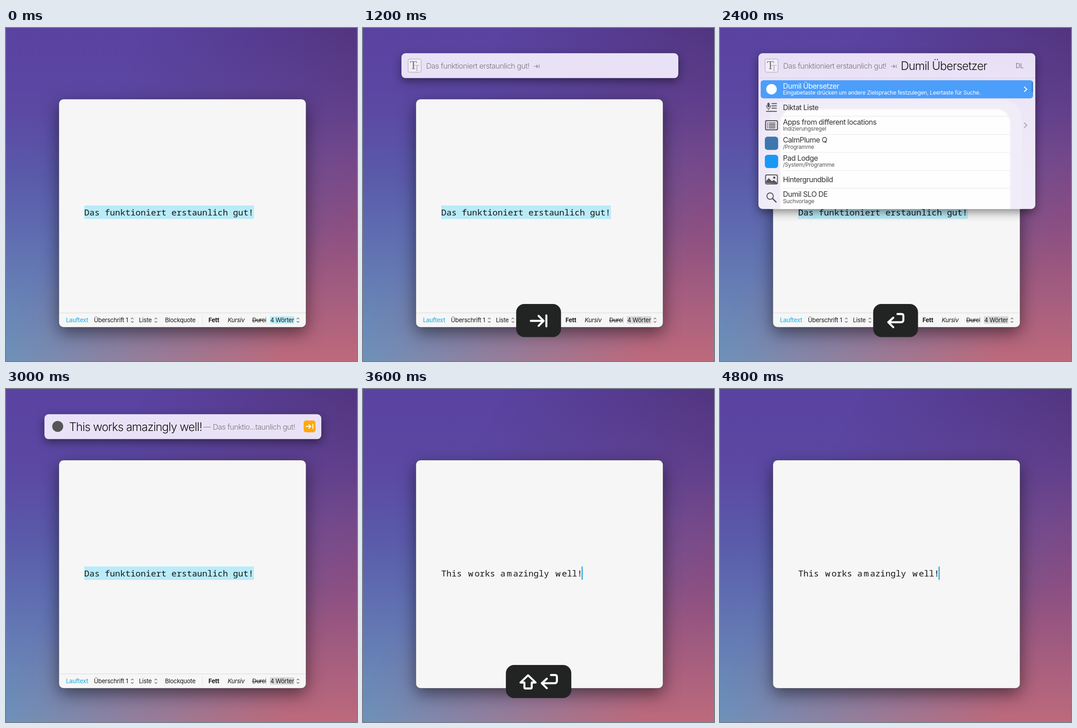
Recreate the animation shown at these times as an HTML page. Size 767 by 730 pixels, loop 5 s.

```html
<!DOCTYPE html>
<html lang="de">
<head>
<meta charset="utf-8">
<title>Übersetzen per Tastatur</title>
<style>
html, body { margin: 0; width: 100%; height: 100%; overflow: hidden; }
body {
  position: relative;
  background: linear-gradient(#5a42a1, #5b49a3 25%, #5a5aaa 45%, #6070b1 65%, #6985b6 85%, #6b94bd);
}
body::before {
  content: ""; position: absolute; inset: 0;
  background: linear-gradient(#4f3074, #5e3b85 20%, #774787 40%, #8b4f82 60%, #a45d7f 80%, #bd6a7b);
  -webkit-mask-image: linear-gradient(115deg, transparent 28%, #000 85%);
  mask-image: linear-gradient(115deg, transparent 28%, #000 85%);
}
svg { position: absolute; left: 0; top: 0; display: block; }
text { font-family: Inter, "Liberation Sans", sans-serif; font-optical-sizing: none; white-space: pre; }
.mono { font-family: "Noto Sans Mono", "DejaVu Sans Mono", monospace; }
.serif { font-family: "Liberation Serif", "Noto Serif", serif; }
.line { fill: none; stroke-linecap: round; stroke-linejoin: round; }
.window { filter: drop-shadow(0 12px 18px rgba(0,0,0,.5)); }
.panel { filter: drop-shadow(0 7px 10px rgba(0,0,0,.45)); }
</style>
</head>
<body>
<svg id="stage" width="767" height="730" viewBox="0 0 767 730"></svg>
<script>
const LOOP = 5000, STEP = 200;
const GERMAN = 'Das funktioniert erstaunlich gut!';
const ENGLISH = 'This works amazingly well!';
const TOOL = 'Dumil Übersetzer';
const HINT = 'Eingabetaste drücken um andere Zielsprache festzulegen, Leertaste für Suche.';

// Each entry holds from its time until the next one.
const KEYS = [[0, ''], [200, 'cmd'], [1000, 'tab'], [1400, ''], [1600, 'D'], [1800, ''], [2000, 'L'],
  [2400, 'ret'], [2800, ''], [3200, 'shift'], [3400, 'shift ret'], [4000, '']];
const BAR = [[0, ''], [600, 'text'], [1000, 'tab'], [1600, 'dark'], [2000, 'tool'],
  [2600, 'run'], [2800, 'result'], [3600, '']];
const at = (track, t) => track.filter(e => e[0] <= t).pop()[1];

const text = (x, y, s, size, fill, more = '') =>
  `<text x="${x}" y="${y}" font-size="${size}" fill="${fill}" letter-spacing="${size > 14 ? -.033 : -.018}em" ${more}>${s}</text>`;
const rect = (x, y, w, h, r, fill, more = '') =>
  `<rect x="${x}" y="${y}" width="${w}" height="${h}" rx="${r}" fill="${fill}" ${more}/>`;
const line = (d, color, width, more = '') =>
  `<path class="line" d="${d}" stroke="${color}" stroke-width="${width}" ${more}/>`;
const dot = (x, y, r, fill) => `<circle cx="${x}" cy="${y}" r="${r}" fill="${fill}"/>`;
const light = 'font-weight="300"';

// Duospaced type: m and w take one and a half cells.
function mono(s) {
  const cell = 11.21;
  let x = 171;
  const xs = [...s].map(c => {
    const wide = /[mw]/i.test(c) ? cell / 2 : 0, left = x + wide / 2;
    x += cell + wide;
    return left.toFixed(2);
  });
  return `<text class="mono" x="${xs.join(' ')}" y="410.5" font-size="18.7" fill="#151515">${s}</text>`;
}

const stepper = x => line(`M${x - 2.5} 638l2.5-2.5 2.5 2.5m-5 5l2.5 2.5 2.5-2.5`, '#666', 1.1);

function toolbar(active) {
  const label = (x, s, more) => text(x, 645, s, 13, '#161616', more);
  return rect(116, 624, 539, 1, 0, '#dadada') +
    text(131, 645, 'Lauftext', 13, '#32b5e5', 'font-weight="500"') +
    label(192, 'Überschrift 1') + stepper(276) + label(290.5, 'Liste') + stepper(327.5) +
    label(347.5, 'Blockquote') + rect(429, 630, 1, 20, 0, '#e2e2e2') +
    label(442.5, 'Fett', 'font-weight="700"') + label(484.5, 'Kursiv', 'font-style="italic"') +
    `<g clip-path="url(#cut)">${label(538, 'Durchgestrichen', 'text-decoration="line-through"')}</g>` +
    rect(568, 630, 1, 20, 0, '#e2e2e2') +
    rect(577, 632, 53, 16, 0, active ? '#b9ebf9' : '#d7d7d7') + label(577.5, '4 Wörter') + stepper(638);
}

function editor(done, active) {
  return `<g class="window">${rect(115.7, 156, 539.8, 500, 10, '#f6f6f6', 'stroke="#000" stroke-opacity=".45" stroke-width=".7"')}</g>` +
    (done ? mono(ENGLISH) + rect(477.5, 389, 2.7, 29.5, 1, '#3badde')
          : rect(171, 389, 370.7, 29.5, 0, '#b9ebf9') + mono(GERMAN) + toolbar(active));
}

// Row icons, drawn around their own centre.
const bars = (x, ys, w, c) => line(ys.map(y => `M${x} ${y}h${w}`).join(''), c, 1.8);
const ICON = {
  brush: () => line('M-12 10l9-9-3-4 4-4 3 2 7-8 5 5-7 8 2 3-4 4-4-3-9 9q-3 0-3-3zM-6-3L5 7', '#fff', 1.7),
  folder: () => `<path d="M-15-11q0-2 2-2h8l3 3h15q2 0 2 2v18q0 2-2 2h-26q-2 0-2-2z" fill="#42a9dc"/>` +
    rect(-15, -7, 30, 20, 2, '#68c8f2') + line('M-4-3h6l3 3v8h-9z', '#43a7d6', 1),
  square: c => rect(-14.5, -14.5, 29, 29, 6, c),
  circle: (c, r = 14.5) => dot(0, 0, r, c),
  dictate: () => rect(-9, -10, 5, 10, 2.5, '#555') + line('M-11-4q0 7 4.500 7t4.500-7M-6.500 3v3', '#555', 1.3) +
    bars(1, [-8, -3, 2], 10, '#555') + bars(-11, [9], 22, '#555'),
  rule: () => rect(-13, -10, 26, 20, 2, 'none', 'stroke="#444" stroke-width="2"') +
    bars(-9, [-5, -1.5, 2, 5.5], 1, '#444') + bars(-5, [-5, -1.5, 2, 5.5], 13, '#444'),
  picture: () => rect(-13, -10, 26, 20, 3, 'none', 'stroke="#555" stroke-width="2"') + dot(6, -4, 2.5, '#555') +
    '<path d="M-12 8V4l6-7 7 7 4-3 7 6v2z" fill="#555"/>',
  search: () => `<circle cx="-3" cy="-3" r="7" fill="none" stroke="#555" stroke-width="2"/>` + line('M2.500 2.500L10 10', '#555', 2.6),
};

// Rows: icon, its colour, title, subtitle, has an arrow.
const APPS = '/Programme';
const LISTS = {
  dark: [
    ['brush', '', 'Dunkel', 'Theme'],
    ['folder', '', 'Dokumente (Documents)', '/Users/torben', 1],
    ['folder', '', 'Dumil-Action', '~/Developer/GitHub/LaunchBar', 1],
    ['square', '#353233', 'DZ3', APPS],
    ['square', '#2fb2f4', 'Dim Oak', APPS, 1],
    ['circle', '#d95b35', 'DimpFernBo Secrecy Companions', APPS],
    ['circle', '#555', TOOL, HINT, 1],
  ],
  tool: [
    ['circle', '#fff', TOOL, HINT, 1],
    ['dictate', '', 'Diktat Liste'],
    ['rule', '', 'Apps from different locations', 'Indizierungsregel', 1],
    ['square', '#3d77ac', 'CalmPlume Q', APPS],
    ['square', '#1b98f5', 'Pad Lodge', '/System/Programme'],
    ['picture', '', 'Hintergrundbild'],
    ['search', '', 'Dumil SLO DE', 'Suchvorlage'],
  ],
};

function row([icon, color, title, sub, arrow], i) {
  const y = 134.2 + i * 39.55, on = i === 0;
  const r = icon === 'circle' && title === TOOL ? 11.5 : undefined;
  return (on ? rect(89, 114.5, 595, 39.7, 6, '#4c9efb') : '') +
    (i > 1 ? rect(137, Math.round(y - 20.3), 496, 1, 0, '#e7e5ec') : '') +
    `<g transform="translate(112.5 ${y})">${ICON[icon](color, r)}</g>` +
    text(137.5, y + (sub ? -1.5 : 5.8), title, 16, on ? '#fff' : '#333') +
    (sub ? text(137.5, y + 12, sub, 12, on ? '#fff' : '#555') : '') +
    (arrow ? line(`M665 ${y - 5}l5.500 5-5.500 5`, on ? '#fff' : '#aaa7b0', 2) : '');
}

function list(name) {
  return `<g clip-path="url(#panel)">` + rect(108, 158, 552, 300, 42, '#f1edf8', 'filter="url(#soft)"') +
    rect(132, 178, 502, 280, 30, '#fefeff', 'filter="url(#soft)"') + '</g>' +
    rect(84, 109, 605, 1, 0, '#d9d0e6') + LISTS[name].map(row).join('') +
    (name === 'tool' ? rect(681, 118, 3, 23, 1.5, '#397bc6') : '');
}

const typeIcon = opacity => `<g opacity="${opacity}">` +
  rect(98.5, 68, 28.5, 29, 3.5, '#f8f6fa', 'stroke="#777" stroke-width="1"') +
  `<text class="serif" x="112.500" y="94" font-size="18" fill="#8a8a8a">T</text>` +
  `<text class="serif" x="102.500" y="90" font-size="25" fill="#222">T</text></g>`;
const tabButton = rect(650.5, 69, 25.7, 26, 5, '#fea909') + line('M656 82h10m-4-4l4 4-4 4M670.500 77.500v9', '#fff', 2);
const big = (x, s) => text(x, 92, s, 25, '#111', light);
const small = (x, s) => text(x, 89, s, 16.5, '#777', light);

function header(mode) {
  if (mode === 'text') return typeIcon(1) + big(138, GERMAN) + tabButton;
  if (mode === 'result') return dot(113, 82, 12, '#555') + big(138, ENGLISH) +
    small(431, '—') + small(452, 'Das funktio...taunlich gut!') + tabButton;
  const base = typeIcon(.6) + small(138, GERMAN) + line('M374 84h8m-3-3l3 3-3 3M385 80.500v7', '#777', 1.1);
  if (mode === 'tab') return base;
  if (mode === 'dark') return base + big(395, 'Dunkel') + text(654, 88, 'D', 14, '#777') + rect(654, 91, 10, 1, 0, '#4baae0');
  return base + big(395, TOOL) + text(646, 88, 'DL', 14, '#777');
}

function launcher(mode) {
  if (!mode) return '';
  const open = mode in LISTS;
  return `<g class="panel">${rect(84, 55.3, 605, open ? 341.4 : 54.5, 9, open ? 'url(#tint)' : '#e9e2f7')}</g>` +
    (open ? list(mode) : '') + header(mode);
}

const glyph = (d, scale = 1) => line(d, '#fff', 4.4 / scale, `transform="scale(${scale})"`);
const letter = s => `<text y="16" font-size="44" font-weight="600" fill="#fff" text-anchor="middle">${s}</text>`;
const CAPS = {
  cmd: [94, `<g transform="translate(-19.200 -19.200)">${glyph('M18 3a3 3 0 0 0-3 3v12a3 3 0 1 0 3-3H6a3 3 0 1 0 3 3V6a3 3 0 1 0-3 3h12a3 3 0 1 0 0-6', 1.6)}</g>`],
  tab: [98, glyph('M-17 0H10M0-11L11 0 0 11M17-12V12')],
  ret: [98, glyph('M4-15h9q4 0 4 4v9q0 5-5 5h-28m11-10l-11 10 11 11')],
  shift: [97, glyph('M0-14.500L16.500 1.500H8V12q0 2.500-2.500 2.500h-11Q-8 14.500-8 12V1.500h-8.500z')],
  D: [83, letter('D')],
  L: [77, letter('L')],
};

function badge(keys) {
  if (!keys) return '';
  const names = keys.split(' ');
  const width = CAPS[names[0]][0] + (names.length - 1) * 46;
  return rect(383.7 - width / 2, 605, width, 72.5, 18, '#222423') + names.map((k, i) =>
    `<g transform="translate(${383.7 + (i - (names.length - 1) / 2) * 46} 642)">${CAPS[k][1]}</g>`).join('');
}

const DEFS = `<defs>
  <clipPath id="cut"><rect x="530" y="626" width="38.500" height="28"/></clipPath>
  <clipPath id="panel"><rect x="84" y="55.300" width="605" height="341.400" rx="9"/></clipPath>
  <filter id="soft"><feGaussianBlur stdDeviation="1.500"/></filter>
  <linearGradient id="tint" x2="0" y2="1"><stop stop-color="#e8dff6"/><stop offset=".35" stop-color="#ede6f7"/><stop offset="1" stop-color="#efebf7"/></linearGradient>
</defs>`;

const stage = document.getElementById('stage');
let shown = -1;
function draw() {
  const t = Math.floor(performance.now() % LOOP / STEP) * STEP;
  if (t !== shown) {
    shown = t;
    stage.innerHTML = DEFS + editor(t >= 3600, t < 600) + launcher(at(BAR, t)) + badge(at(KEYS, t));
  }
  requestAnimationFrame(draw);
}
draw();
</script>
</body>
</html>
```
